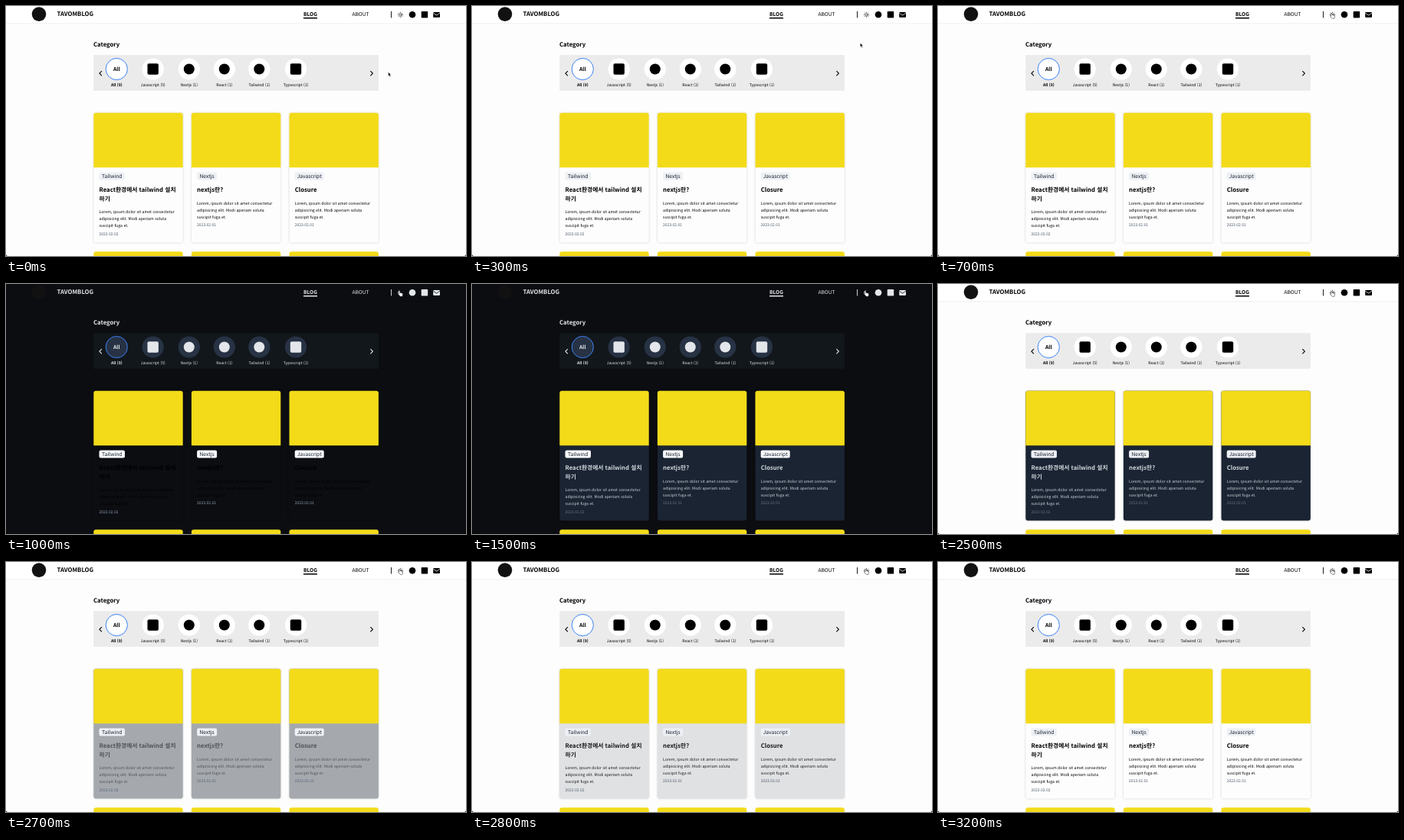
Animation of 600x327 px, one loop 3500 ms. Source, as an HTML page:

```html
<!DOCTYPE html>
<html lang="ko">
<head>
<meta charset="utf-8">
<title>Blog theme toggle</title>
<style>
  html, body { margin: 0; width: 100%; height: 100%; overflow: hidden; }
  svg { display: block; width: 100%; height: 100%; }
  :root {
    --fade: 0%;
    --page: #fdfdfd; --header: #fff; --line: #ececec; --ink: #000; --bar: #ebebeb;
    --disc: #fff; --tag: #edf0f4; --date: #475569;
  }
  .dark {
    --page: #0b0d11; --header: #0b0d11; --line: #0b0d11; --ink: #e3e6ea; --bar: #12171c;
    --disc: #273244; --tag: #f8fafc; --date: #94a3b8;
  }
  text { font-family: "Noto Sans CJK KR", "Noto Sans CJK", "Noto Sans", sans-serif; fill: var(--ink); }
  .bold { font-weight: 700; }
  .medium { font-weight: 500; }
  .page { fill: var(--page); }
  .ink { fill: var(--ink); }
  .stroke { fill: none; stroke: var(--ink); stroke-linecap: round; stroke-linejoin: round; }
  .disc { fill: var(--disc); }
  .shadow { fill: var(--page); filter: drop-shadow(0 .6px .9px #0003); }
  .panel { fill: #1a2433; fill-opacity: var(--fade); }
  .image { fill: #f3db19; }
  .tag { fill: var(--tag); }
  .tag-text { fill: #17202e; }
  .copy { fill: color-mix(in srgb, #d0d5db var(--fade), #000); }
  .date { fill: color-mix(in srgb, #6b7585 var(--fade), var(--date)); }
  .light-only, .dark .dark-only { display: inline; }
  .dark-only, .dark .light-only { display: none; }
</style>
</head>
<body>
<svg id="stage" viewBox="0 0 600 327" preserveAspectRatio="none" text-rendering="geometricPrecision"></svg>
<script>
const LOOP = 3500, STEP = 100, FADE = 500;
const HAND_AT = 700, DARK_AT = 1000, LIGHT_AT = 2500;
const stage = document.getElementById('stage');

const text = (x, y, size, content, cls = '', anchor = 'start') =>
  `<text x="${x}" y="${y}" font-size="${size}" class="${cls}" text-anchor="${anchor}">${content}</text>`;
const rect = (x, y, w, h, cls, r = 0) =>
  `<rect x="${x}" y="${y}" width="${w}" height="${h}" rx="${r}" class="${cls}"/>`;
const circle = (x, y, r, cls, extra = '') =>
  `<circle cx="${x}" cy="${y}" r="${r}" class="${cls}" ${extra}/>`;
const path = (d, cls, extra = '') => `<path d="${d}" class="${cls}" ${extra}/>`;

function header() {
  let rays = '';
  for (let i = 0; i < 8; i++) {
    const c = Math.cos(i * Math.PI / 4), s = Math.sin(i * Math.PI / 4);
    rays += `M${514.5 + 2.5 * c} ${11.5 + 2.5 * s}L${514.5 + 3.3 * c} ${11.5 + 3.3 * s}`;
  }
  return rect(0, 0, 600, 22.6, '', 0).replace('class=""', 'style="fill:var(--header)"') +
    '<rect y="22.6" width="600" height=".8" style="fill:var(--line)"/>' +
    circle(43, 10.6, 9.3, '', 'fill="#111"') +
    text(66.5, 13.2, 7.75, 'TAVOMBLOG', 'bold') +
    text(388, 12.5, 6.6, 'BLOG', 'bold') +
    rect(388, 15, 18, 1.5, 'ink') +
    text(451.5, 12.5, 6.6, 'ABOUT') +
    rect(502, 7, .9, 8.5, 'ink') +
    `<g class="light-only">${circle(514.5, 11.5, 1.5, 'stroke', 'stroke-width=".6"')}${path(rays, 'stroke', 'stroke-width=".6"')}</g>` +
    `<g class="dark-only">${path('M513.7 8.2A3.4 3.4 0 1 0 517.8 12.6A3.2 3.2 0 0 1 513.7 8.2Z', 'ink')}</g>` +
    circle(530, 11.3, 4.3, 'ink') +
    rect(541.7, 7.1, 8.5, 8.5, 'ink', .8) +
    rect(557.2, 7.9, 8.8, 7, 'ink', .9) +
    path('M557.4 9.3L561.6 12.1L565.8 9.3', '', 'fill="none" stroke-width=".8" style="stroke:var(--header)"');
}

function categories() {
  const list = [
    [144.3, 'All (9)'], [191.7, 'Javascript (5)', 'square'], [238.8, 'Nextjs (1)', 'round'],
    [284.8, 'React (1)', 'round'], [330.3, 'Tailwind (1)', 'round'], [378, 'Typescript (1)', 'square']
  ];
  return text(114, 53, 7.75, 'Category', 'bold') +
    rect(114.2, 64.2, 371.7, 46.7, '').replace('class=""', 'style="fill:var(--bar)"') +
    path('M124.6 85.4L121.9 88.1L124.6 90.8M475.7 85.4L478.4 88.1L475.7 90.8', 'stroke', 'stroke-width="1.1"') +
    list.map(([x, label, icon]) =>
      circle(x, 82.5, 14.1, 'disc', icon ? '' : 'stroke="#3b82f6" stroke-width="1"') +
      (icon === 'square' ? rect(x - 7.2, 75.3, 14.4, 14.4, 'ink', 2) :
       icon === 'round' ? circle(x, 82.5, 7, 'ink') :
       text(x, 84.7, 6.8, 'All', 'bold', 'middle')) +
      text(x, 105.2, 5.1, label, icon ? '' : 'bold', 'middle')
    ).join('');
}

function card(x, tag, tagWidth, title, date) {
  const left = x + 7.2, shift = (title.length - 1) * 11.3;
  const body = ['Lorem, ipsum dolor sit amet consectetur', 'adipisicing elit. Modi aperiam soluta', 'suscipit fuga et.'];
  const image = y => path(`M${x} ${y + 71.5}V${y + 3}q0-3 3-3h110.4q3 0 3 3v68.5z`, 'image');
  return rect(x, 139.7, 116.4, 169.7, 'shadow', 3) +
    rect(x, 139.7, 116.4, 169.7, 'panel', 3) +
    image(139.7) + image(321.2) +
    rect(left, 217.4, tagWidth, 10.2, 'tag', 2) +
    text(left + tagWidth / 2, 225, 6.7, tag, 'tag-text medium', 'middle') +
    title.map((line, i) => text(left, 243.2 + i * 11.4, 7.75, line, 'copy bold')).join('') +
    body.map((line, i) => text(left, 259.5 + shift + i * 9.1, 5.15, line, 'copy')).join('') +
    text(left, 288.2 + shift, 5, date, 'date');
}

stage.innerHTML = rect(0, 0, 600, 327, 'page') + header() + categories() +
  card(114.3, 'Tailwind', 33.5, ['React환경에서 tailwind 설치', '하기'], '2023.02.02') +
  card(241.9, 'Nextjs', 26, ['nextjs란?'], '2023.02.01') +
  card(369.5, 'Javascript', 38, ['Closure'], '2023.02.01') +
  path('M0 324.5Q0 327 2.5 327H0ZM600 324.5Q600 327 597.5 327H600Z', '') +
  `<g id="cursor" stroke-linejoin="round">
    <path id="arrow" d="M0 0V5.6L1.3 4.5L2.2 6.5L3.1 6.1L2.2 4.1H3.9Z" fill="#000" stroke="#fff" stroke-width=".5"/>
    <path id="hand" d="M-1 0q.6-.5 1 .2l.5 1.8.2-.5q.7-.3.9.4.8-.3 1 .4.8-.1.9.7l-.1 1.9-.6 1.4H.3L-2.3 3.5q-.2-.9.8-.7l.4.3L-1.5.9q-.1-.6.5-.9Z" fill="#fff" stroke="#111" stroke-width=".5"/>
  </g>`;

const cursor = document.getElementById('cursor');
const arrow = document.getElementById('arrow');
const hand = document.getElementById('hand');
const clamp = v => Math.min(1, Math.max(0, v));

// cubic-bezier(.4, 0, .2, 1), solved by bisection
function ease(x) {
  let low = 0, high = 1;
  for (let i = 0; i < 24; i++) {
    const s = (low + high) / 2, r = 1 - s;
    if (1.2 * s * r * r + .6 * s * s * r + s ** 3 < x) low = s; else high = s;
  }
  return low * low * (3 - 2 * low);
}

function draw(now) {
  const t = Math.floor(now % LOOP / STEP) * STEP;
  const move = clamp(t / 600), along = move * move * (3 - 2 * move);
  const fade = ease(clamp((t - DARK_AT) / FADE)) - ease(clamp((t - LIGHT_AT) / FADE));
  const root = document.documentElement;
  root.classList.toggle('dark', t >= DARK_AT && t < LIGHT_AT);
  root.style.setProperty('--fade', `${(clamp(fade) * 100).toFixed(2)}%`);
  cursor.setAttribute('transform', `translate(${498.6 + 15.4 * along} ${86.3 - 76.3 * along})`);
  arrow.style.display = t < HAND_AT ? '' : 'none';
  hand.style.display = t < HAND_AT ? 'none' : '';
}

const start = performance.now();
function tick() {
  draw(performance.now() - start);
  requestAnimationFrame(tick);
}
tick();
</script>
</body>
</html>
```
